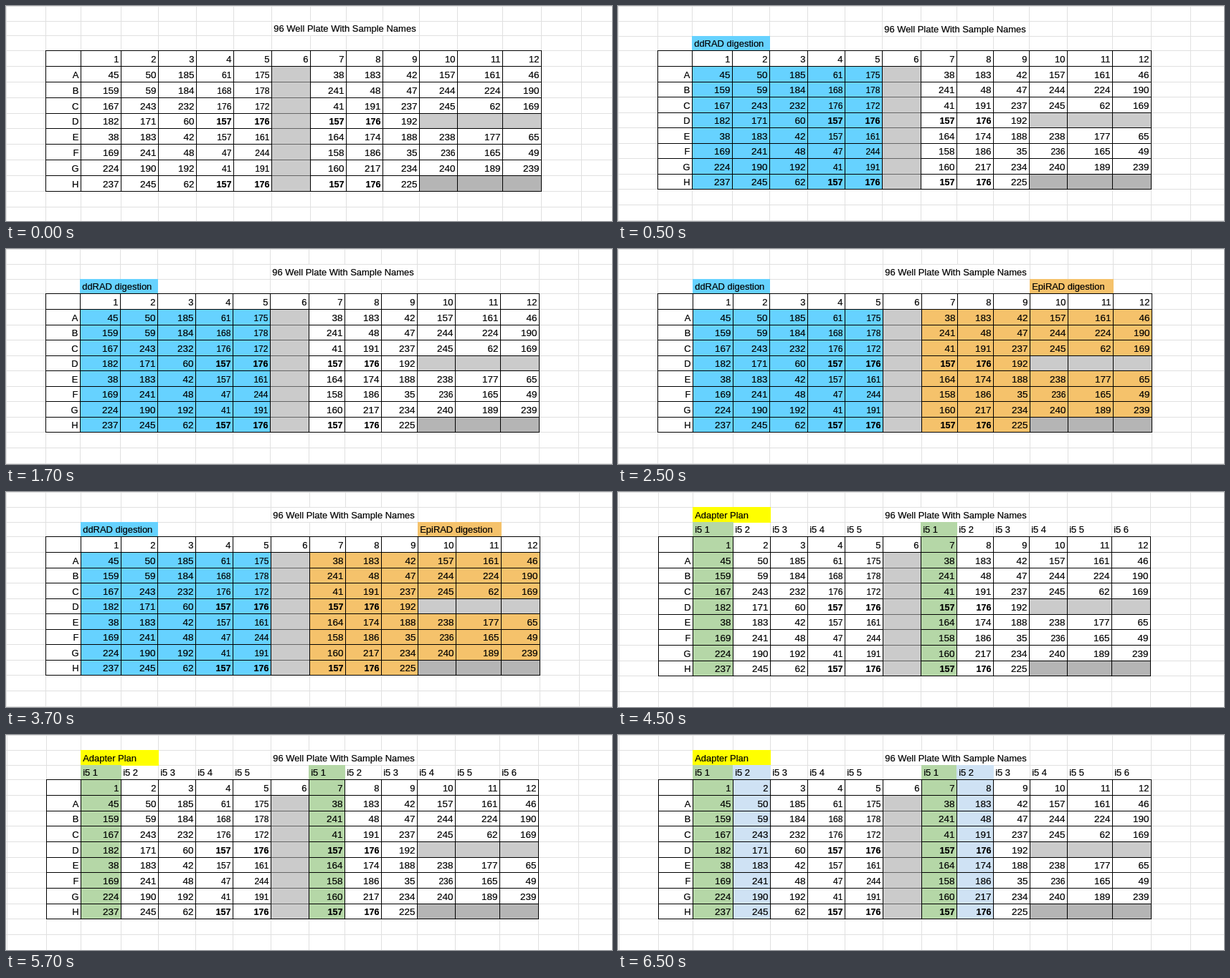
Recreate the animation shown at these times as an HTML page. Size 845 by 301 pixels, loop 8000 ms.

```html
<!DOCTYPE html>
<html lang="en">
<head>
<meta charset="utf-8">
<title>96 Well Plate</title>
<style>
  html, body { margin: 0; width: 100%; height: 100%; overflow: hidden; background: #fff; }
  svg { display: block; width: 845px; height: 301px; }
  text {
    font-family: "Liberation Sans", Arial, sans-serif; white-space: pre;
    fill: #000; stroke: #000; stroke-width: 0.2px;
  }
  rect { shape-rendering: crispEdges; }
</style>
</head>
<body>
<svg id="stage" viewBox="0 0 845 301"></svg>
<script>
const NS = 'http://www.w3.org/2000/svg';
const stage = document.getElementById('stage');
const LOOP = 8000;

// Column edges; column 0 holds the row letters, 1-12 the wells.
const EDGES = [55, 104, 160, 212, 265, 317, 370, 424, 474, 525, 576, 629, 692, 746];
const ROWS = 9;
const WELLS = [
  '45 50 185 61 175 - 38 183 42 157 161 46',
  '159 59 184 168 178 - 241 48 47 244 224 190',
  '167 243 232 176 172 - 41 191 237 245 62 169',
  '182 171 60 *157 *176 - *157 *176 192 - - -',
  '38 183 42 157 161 - 164 174 188 238 177 65',
  '169 241 48 47 244 - 158 186 35 236 165 49',
  '224 190 192 41 191 - 160 217 234 240 189 239',
  '237 245 62 *157 *176 - *157 *176 225 = = ='
].map(line => line.split(' '));

const GRID = '#e0e0e0', BLUE = '#66d2ff', ORANGE = '#f5c26b';
const GREEN = '#b5d7a7', PALE = '#cfe2f4', YELLOW = '#ffff00';

// Fills: [colour, first column, last column, first row, last row]
const ddFill = [[BLUE, 1, 2, -1, -1], [BLUE, 1, 5, 1, 8]];
const epiFill = [[ORANGE, 10, 11, -1, -1], [ORANGE, 7, 12, 1, 8]];
const planFill = [[YELLOW, 1, 2, -2, -2], [GREEN, 1, 1, -1, 8], [GREEN, 7, 7, -1, 8]];
const paleFill = [[PALE, 2, 2, -1, 8], [PALE, 8, 8, -1, 8]];

// Labels: [text, column, last column covered, row]
const title = ['96 Well Plate With Sample Names', 6, 9, -2];
const ddLabel = ['ddRAD digestion', 1, 2, -1];
const epiLabel = ['EpiRAD digestion', 10, 11, -1];
const planLabels = [['Adapter Plan', 1, 2, -2]];
for (let i = 1; i <= 5; i++) planLabels.push(['i5 ' + i, i, i, -1]);
for (let i = 1; i <= 6; i++) planLabels.push(['i5 ' + i, i + 6, i + 6, -1]);

const SCENES = [
  { at: 0, left: 55, right: 746, top: 62, bottom: 259, size: 13, fills: [], labels: [title] },
  { at: 500, left: 54.7, right: 742.7, top: 62.4, bottom: 256.4, size: 12.95,
    fills: ddFill, labels: [title, ddLabel] },
  { at: 2500, left: 55, right: 743.6, top: 62.4, bottom: 256.4, size: 12.95,
    fills: [...ddFill, ...epiFill], labels: [title, ddLabel, epiLabel] },
  { at: 4500, left: 55.7, right: 742, top: 62.4, bottom: 257.4, size: 12.95,
    fills: planFill, labels: [title, ...planLabels] },
  { at: 6500, left: 55.7, right: 742.7, top: 62.4, bottom: 257.4, size: 12.95,
    fills: [...planFill, ...paleFill], labels: [title, ...planLabels] }
];

function add(parent, name, attrs, text) {
  const node = document.createElementNS(NS, name);
  for (const key in attrs) node.setAttribute(key, attrs[key]);
  if (text !== undefined) node.textContent = text;
  parent.appendChild(node);
  return node;
}

function build(scene) {
  const g = add(stage, 'g', { visibility: 'hidden' });
  const { left, right, top, bottom, size } = scene;
  const scale = (right - left) / (EDGES[13] - EDGES[0]);
  const mapX = x => Math.round(left + (x - EDGES[0]) * scale);
  const colX = i => mapX(EDGES[i]);
  const rowY = i => Math.round(top + i * (i < 0 ? 20.7 : (bottom - top) / ROWS));
  const box = (x, y, width, height, fill) => add(g, 'rect', { x, y, width, height, fill });
  const cells = (fill, c0, c1, r0, r1) => box(colX(c0), rowY(r0),
    colX(c1 + 1) - colX(c0) + 1, rowY(r1 + 1) - rowY(r0) + 1, fill);
  const baseline = row => rowY(row + 1) - 5;
  const rightText = (str, col, row, fontSize = size, weight = 400) => add(g, 'text', {
    x: colX(col + 1) - 2.5, y: baseline(row), 'text-anchor': 'end',
    'font-size': fontSize, 'font-weight': weight
  }, str);

  // Sheet gridlines
  for (let r = -3; r <= ROWS + 2; r++) box(0, rowY(r), 845, 1, GRID);
  for (const x of [0, ...EDGES, 802]) box(Math.max(0, mapX(x)), 0, 1, 301, GRID);

  // Long text hides the gridlines it runs over
  for (const [, c0, c1, row] of scene.labels) {
    if (c1 > c0) box(colX(c0) + 1, rowY(row) + 1, colX(c1 + 1) - colX(c0) - 1, rowY(row + 1) - rowY(row) - 1, '#fff');
  }

  cells('#fff', 0, 12, 0, 8);
  for (const fill of scene.fills) cells(...fill);
  WELLS.forEach((line, r) => line.forEach((v, c) => {
    if (v === '-') cells('#cbcbcb', c + 1, c + 1, r + 1, r + 1);
    if (v === '=') cells('#b5b5b5', c + 1, c + 1, r + 1, r + 1);
  }));

  // Table borders, softer between the empty wells of column 6
  for (let r = 0; r <= ROWS; r++) {
    box(colX(0), rowY(r), colX(13) - colX(0) + 1, 1, '#000');
    if (r > 1 && r < ROWS) box(colX(6), rowY(r), colX(7) - colX(6), 1, '#666');
  }
  for (let c = 0; c <= 13; c++) box(colX(c), rowY(0), 1, rowY(ROWS) - rowY(0) + 1, '#000');

  for (let c = 1; c <= 12; c++) rightText(c, c, 0);
  WELLS.forEach((line, r) => {
    rightText('ABCDEFGH'[r], 0, r + 1);
    line.forEach((v, i) => {
      const col = i + 1;
      if (v === '-' || v === '=') return;
      const small = col === 4 || col === 5 || (col === 10 && r === 5);
      if (v[0] === '*') rightText(v.slice(1), col, r + 1, size - 0.4, 700);
      else rightText(v, col, r + 1, small ? size - 0.9 : size + 0.5);
    });
  });
  for (const [str, col, , row] of scene.labels) {
    add(g, 'text', { x: colX(col) + 3.2, y: baseline(row), 'font-size': size }, str);
  }
  return g;
}

const groups = SCENES.map(build);
const start = performance.now();
let shown = -1;

function draw(now) {
  const t = Math.max(0, now - start) % LOOP;
  let current = 0;
  SCENES.forEach((scene, i) => { if (t >= scene.at) current = i; });
  if (current !== shown) {
    groups.forEach((g, i) => g.setAttribute('visibility', i === current ? 'visible' : 'hidden'));
    shown = current;
  }
  requestAnimationFrame(draw);
}
draw(start);
</script>
</body>
</html>
```
